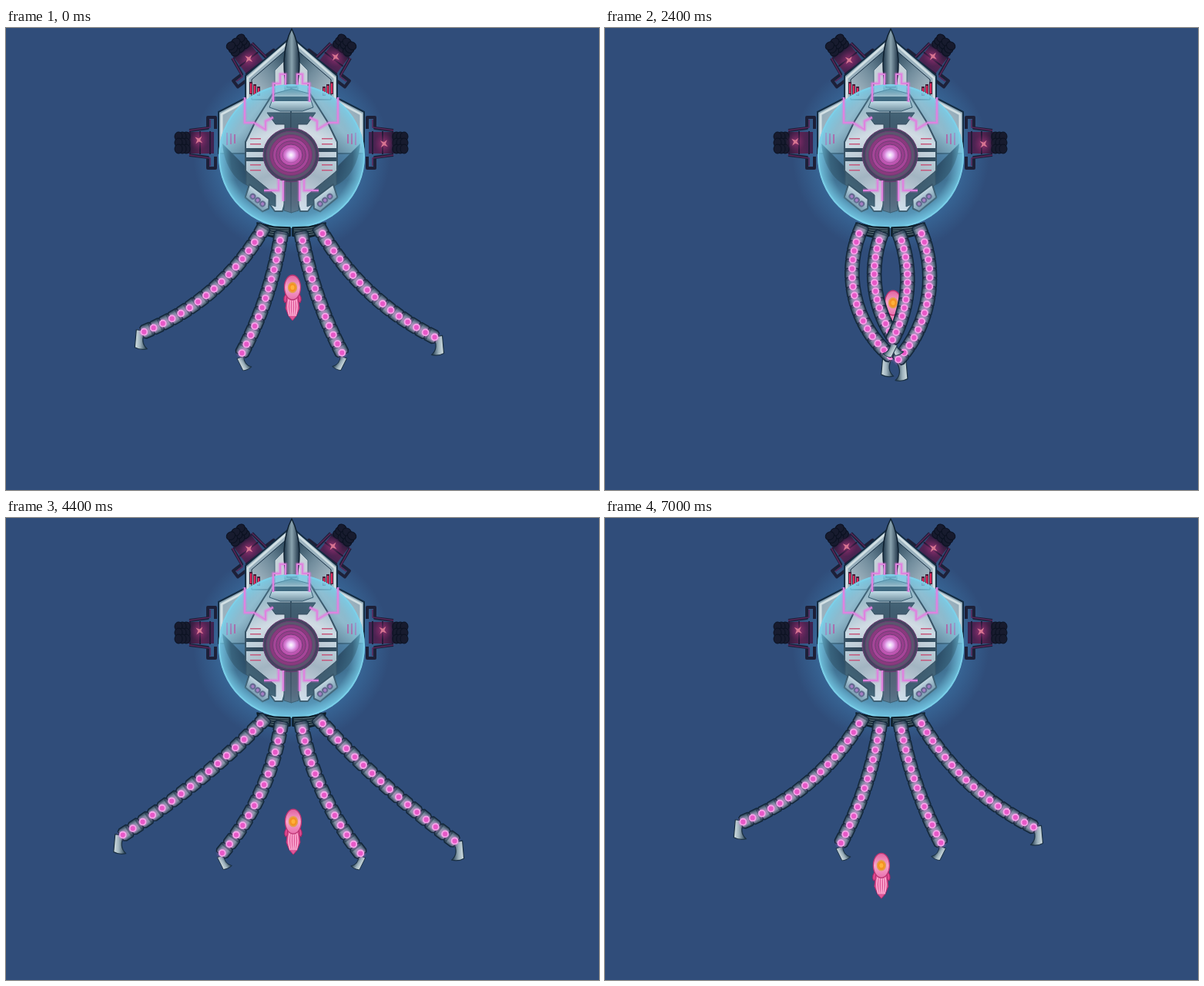
These frames come from a looping animation (770 px wide and 600 px high, 7100 ms). An HTML page with a canvas:

```html
<!DOCTYPE html>
<html lang="en">
<head>
<meta charset="utf-8">
<title>Tentacle machine</title>
<style>
html, body { margin: 0; width: 100%; height: 100%; overflow: hidden; background: #304d7a; }
canvas { display: block; width: 770px; height: 600px; }
</style>
</head>
<body>
<canvas id="stage" width="770" height="600"></canvas>
<script>
const LOOP = 7100, CYCLE = LOOP / 2, STEP = 100, AXIS = 741, DEG = Math.PI / 180;
const stage = document.getElementById('stage').getContext('2d');
let g = stage;

// One swing of the arms. Each arm: length, outward angle at its root and at its tip.
const open = { outer: [201, 30, 67], inner: [155, 9, 27] };
const SWING = [
  [0, open],
  [450, open],
  [850, { outer: [230, 44, 57], inner: [178, 9, 39] }],
  [1000, { outer: [250, 45, 50], inner: [190, 10, 36] }],
  [1250, { outer: [281, 46, 28], inner: [212, 14, 22] }],
  [1600, { outer: [300, 41, -2], inner: [225, 17, 6] }],
  [1750, { outer: [292, 27, -26], inner: [210, 10, 3] }],
  [2400, { outer: [175, 23, -47], inner: [133, 19, -32] }],
  [3400, open],
  [CYCLE, open]
];
const DRIFT = [
  [0, [372, 337]], [2400, [374, 357]], [3600, [373, 341]],
  [5300, [373, 454]], [6400, [364, 459]], [LOOP, [358, 450]]
];

const lerp = (a, b, k) => a + (b - a) * k;
const mix = (a, b, k) => a.map((v, i) => lerp(v, b[i], k));

function span(track, t) {
  const i = track.findIndex(key => key[0] > t);
  const [t0, a] = track[i - 1], [t1, b] = track[i];
  return [a, b, (t - t0) / (t1 - t0)];
}

function noise(n) {
  const s = Math.sin(n * 127.1 + 11.7) * 43758.5453;
  return s - Math.floor(s);
}

function fade(x0, y0, x1, y1, ...colors) {
  const f = g.createLinearGradient(x0, y0, x1, y1);
  colors.forEach((c, i) => f.addColorStop(i / (colors.length - 1), c));
  return f;
}

function glow(x, y, r, ...colors) {
  const f = g.createRadialGradient(x, y, 0, x, y, r);
  colors.forEach((c, i) => f.addColorStop(i / (colors.length - 1), c));
  g.fillStyle = f;
  g.beginPath();
  g.arc(x, y, r, 0, 7);
  g.fill();
}

function draw(path, fill, line, width = 1) {
  const p = new Path2D(path);
  if (fill) { g.fillStyle = fill; g.fill(p); }
  if (line) { g.strokeStyle = line; g.lineWidth = width; g.stroke(p); }
}

function oval(x, y, rx, ry, fill, line, width = 1) {
  g.beginPath();
  g.ellipse(x, y, rx, ry, 0, 0, 7);
  if (fill) { g.fillStyle = fill; g.fill(); }
  if (line) { g.strokeStyle = line; g.lineWidth = width; g.stroke(); }
}

function box(x, y, w, h, fill) {
  g.fillStyle = fill;
  g.fillRect(x, y, w, h);
}

function repeat(n, make) {
  for (let i = 0; i < n; i++) make(i);
}

function at(x, y, turn, make) {
  g.save();
  g.translate(x, y);
  g.rotate(turn);
  make();
  g.restore();
}

function mirror(make) {
  g.save();
  g.translate(AXIS, 0);
  g.scale(-1, 1);
  make();
  g.restore();
}

function both(make) {
  make();
  mirror(make);
}

function circuit(path) {
  draw(path, null, 'rgba(236,110,226,.35)', 5);
  draw(path, null, '#df83df', 2);
}

function pod(x, y, turn) {
  at(x, y, turn, () => {
    for (const side of [-1, 1]) {
      draw(`M-12 ${side * 16}L12 ${side * 19}V${side * 33}H22V${side * 18}`, null, '#1d2038', 4);
      draw(`M-12 ${side * 16}L15 ${side * 20}V${side * 30}`, null, '#5a2558', 1.5);
    }
    box(-14, -14, 34, 28, fade(-14, 0, 20, 0, '#2a1c3b', '#5a2453', '#3d2350'));
    repeat(3, i => box(-12 + i * 13, -15, 2, 30, '#221b38'));
    repeat(9, i => oval(-16 - i % 3 * 5, Math.floor(i / 3) * 8 - 8, 5, 6, '#171b2e', '#0b1120'));
  });
}

function hull() {
  const edge = '#142d43', rim = '#d2e0e4';
  both(() => {
    draw('M370 12L311 62V91L276 109V163H371Z',
      fade(276, 40, 371, 110, '#b9cbd5', '#8fa7b5', '#a9bfca', '#40596d'), edge, 2);
    draw('M371 22L319 67V93H340L371 50Z', fade(319, 80, 371, 40, '#a9bcc7', '#728d9d', '#2c485c'), edge);
    draw('M314 92V65L367 18M280 154V112L312 95', null, rim, 3);
    draw('M349 94V55L362 42V94Z', '#c5d2d9', '#496779');
    repeat(3, i => {
      box(316 + i * 5, 70 + i * 3, 4, 16 - i * 2, '#46213b');
      box(317 + i * 5, 72 + i * 3, 2, 13 - i * 2, '#e52e62');
    });
  });
  draw('M371 1C359 25 359 55 365 77H377C383 55 383 25 371 1Z',
    fade(361, 0, 381, 0, '#1d3548', '#8aa3af', '#1b3044'), '#0e2030', 1.5);
}

function core() {
  const dark = '#314759';
  both(() => {
    draw('M281 150C283 180 300 202 318 206L313 182Z', '#24405a');
    draw('M371 86H346L324 121L311 148V185L349 238H359L371 199Z',
      fade(312, 100, 371, 230, '#8da7b5', '#d3dce4', '#a3b4c1', '#e0e2eb'), dark, 2);
    draw('M371 110H339L350 125H362V137H371Z', '#3f5a6d', dark);
    for (const y of [156, 168]) box(312, y, 28, 5, dark);
    draw('M312 186L350 217V232L341 228L312 203Z', '#3b5568', dark);
    draw('M361 198H371V240L361 237Z', '#536276', dark);
    repeat(4, i => box(317, 143 + i * 7 + (i > 1) * 20, 14, 1.5, '#c85377'));
    at(325, 221, .65, () => {
      draw('M-18 -9H14L21 1L17 9L-12 8Z', fade(0, -9, 0, 9, '#d1dce3', '#75899d'), dark, 2);
      repeat(3, i => oval(i * 8 - 5, 1, 3, 3, '#b06abb', '#60547d', 2));
    });
    repeat(3, i => box(286 + i * 5, 136 + i, 2, 16 - i * 2, '#b8509a'));
  });
  draw('M342 103L349 85L371 79L393 85L399 103L385 108H356Z',
    fade(0, 80, 0, 108, '#537082', '#dbe7ec', '#718c9b'), '#2b495e');
  box(347, 89, 48, 6, '#304f65');
  const rings = ['#44435f', '#5a566e', '#8b397e', '#a64598', '#983e8c', '#b84fa9', '#bd59b1'];
  rings.forEach((c, i) => oval(370, 165, 36 - i * 4.2, 35 - i * 4.2, c, '#6d3d73'));
  glow(370, 165, 14, '#fff', '#e8b8f4', 'rgba(215,115,210,.6)', 'rgba(200,80,185,0)');
}

function orb() {
  g.save();
  g.beginPath();
  g.ellipse(371, 166.5, 95, 93.5, 0, 0, 7);
  g.clip();
  box(276, 72, 190, 190, fade(0, 73, 0, 260,
    'rgba(120,180,208,.4)', 'rgba(120,165,190,.4)', 'rgba(45,80,110,.72)', 'rgba(100,170,202,.75)'));
  core();
  glow(371, 166.5, 95, ...[0, 0, 0, .03, .1, .25, .88].map(a => `rgba(120,208,235,${a})`));
  g.restore();
  oval(371, 166.5, 94, 92.5, null, 'rgba(125,211,236,.8)', 2);
}

function wiring() {
  both(() => {
    circuit('M347 96V72H356V60H363V74');
    circuit('M310 90V123H322L337 132V121L347 116');
    circuit('M354 196V211H335M360 198V225');
  });
}

function collar() {
  both(() => {
    draw('M326 253L347 258L369 259V270L349 272L329 267Z', '#192c38', '#0b1b25', 1.5);
    repeat(4, i => draw(`M329 ${256 + i * 3}Q346 ${261 + i * 3} 367 ${261 + i * 2.4}`, null, '#5d757e'));
  });
}

function machine() {
  glow(371, 165, 128, ...[.4, .4, .35, .3, 0].map(a => `rgba(70,150,205,${a})`));
  both(() => {
    pod(314, 39, .92);
    pod(250, 149, 0);
  });
  hull();
  orb();
  wiring();
  collar();
}

function spark(x, y, seed) {
  at(x + (noise(seed) - .5) * 6, y + (noise(seed + 1) - .5) * 6, 0, () => {
    glow(0, 0, 13, 'rgba(215,70,145,.5)', 'rgba(150,40,120,0)');
    draw('M-5 -4L0 -2L4 -5L2 0L5 4L0 2L-4 5L-2 0Z', '#d87591');
  });
}

function squid(x, y) {
  at(x, y, 0, () => {
    for (const s of [-1, 1]) draw(`M${s * 6} 5Q${s * 14} 13 ${s * 10} 20L${s * 5} 15Z`, '#e0488f', '#a02462');
    draw('M-7 10L-9 27L-5 37L0 43L5 37L9 27L7 10Z', '#df5698', '#b02a6c');
    repeat(5, i => draw(`M${i * 2 - 4} 13Q${i * 4 - 8} 24 ${i * 2 - 4} 37`, null, '#ffb4d8', 1.5));
    oval(0, 0, 10.5, 16, fade(0, -16, 0, 16, '#e0629f', '#f9a5cd', '#e870ad'), '#bc3472', 1.3);
    oval(0, 0, 5.5, 6.5, '#f59222', '#e0a05a', 1.5);
    oval(0, 0, 2.5, 3, '#ffb13a');
  });
}

function claw(x, y, turn, size) {
  at(x, y, turn, () => {
    g.scale(size, size);
    draw('M-5 -13L7 -11Q-1 3 9 12Q0 14 -7 10Z', fade(-7, 0, 7, 0, '#d5e2e5', '#9db1bb', '#344d60'), '#1a3043', 1.2);
  });
}

// The heading turns evenly from root to tip; the first joint stays short.
function chain(x, y, joints, [length, root, tip], bias) {
  const first = Math.min(14, length / joints), beads = [];
  for (let i = 0; i <= joints; i++) {
    const turn = lerp(root, tip, i / joints) * (bias ? .9 : 1) + (bias ? 2.5 : 0);
    const a = (90 + turn) * DEG;
    if (i) {
      const size = i > 1 ? (length - first) / (joints - 1) : first;
      x += Math.cos(a) * size;
      y += Math.sin(a) * size;
    }
    beads.push([x, y, a]);
  }
  return beads;
}

function arm(beads, inner) {
  const [x, y, a] = beads[beads.length - 1];
  if (inner) claw(x + 2, y + 2 + 13 * Math.sin(a), -.55, .75);
  else claw(x - 5, y + 5 + 13 * Math.sin(a), 0, 1);
  for (const [bx, by, turn] of beads) at(bx, by, turn, () => {
    draw('M-12 -7L-10 -9H0L3 -7V7L0 9H-10L-12 7Z',
      fade(0, -9, 0, 9, '#30465a', '#8596a6', '#9a93b0', '#74899b', '#2a4054'), '#14283b', 1.5);
    box(-11, -8, 3, 16, 'rgba(20,42,61,.5)');
  });
  for (const [bx, by] of beads) {
    glow(bx, by, 8, 'rgba(250,130,230,.7)', 'rgba(225,120,220,0)');
    oval(bx, by, 4, 4, '#e858c8', '#f6a5ea', 1.8);
  }
}

function arms(t) {
  const [from, to, k] = span(SWING, t % CYCLE);
  const outer = mix(from.outer, to.outer, k), inner = mix(from.inner, to.inner, k);
  arm(chain(330, 267, 15, outer));
  mirror(() => arm(chain(330, 267, 15, outer, true)));
  arm(chain(356, 276, 12, inner), true);
  mirror(() => arm(chain(356, 276, 12, inner, true), true));
}

const backdrop = document.createElement('canvas');
backdrop.width = 770;
backdrop.height = 600;
g = backdrop.getContext('2d');
g.lineJoin = 'round';
box(0, 0, 770, 600, '#304d7a');
machine();
g = stage;
g.lineJoin = 'round';

const begin = performance.now();
function frame() {
  const t = Math.floor((performance.now() - begin) % LOOP / STEP) * STEP;
  g.drawImage(backdrop, 0, 0);
  [314, 250, 425, 491].forEach((x, i) => spark(x, i % 2 ? 148 : 39, t / STEP * 8 + i * 2));
  squid(...mix(...span(DRIFT, t)));
  arms(t);
  requestAnimationFrame(frame);
}
frame();
</script>
</body>
</html>
```
